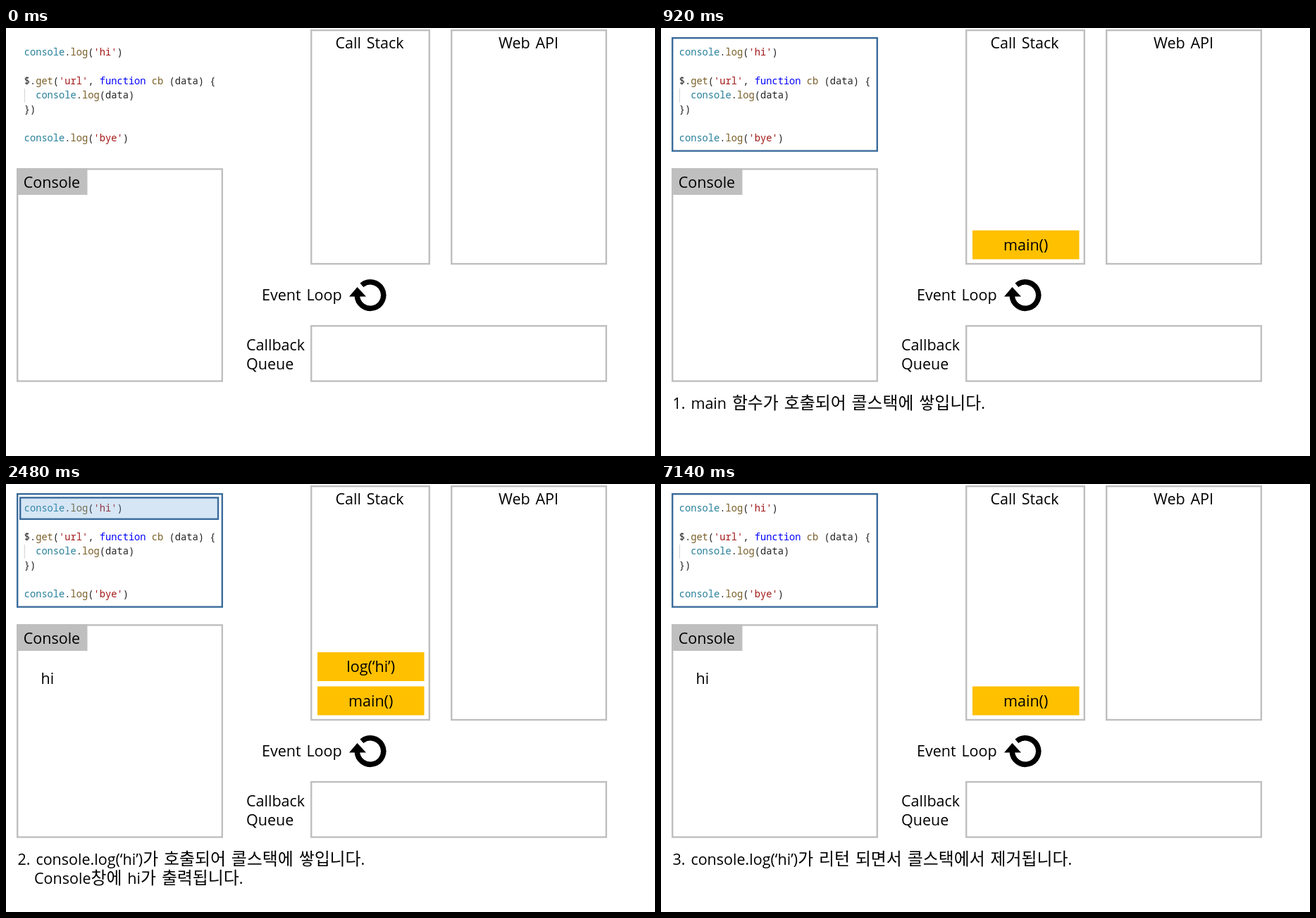
Write an HTML page that moves like this. It is 921 by 608 pixels and loops after 8 s.

```html
<!DOCTYPE html>
<html lang="ko">
<head>
<meta charset="utf-8">
<title>Event loop</title>
<style>
  html, body { margin: 0; width: 100%; height: 100%; overflow: hidden; background: #fff; }
  svg { display: block; width: 921px; height: 608px; }
  text { font: 21.5px 'Open Sans', 'Noto Sans CJK KR', sans-serif; word-spacing: 2.3px; white-space: pre; }
  .hangul { font: 23.9px 'Noto Sans CJK KR', 'Noto Sans CJK', sans-serif; }
  .mid { text-anchor: middle; }
  .code text { font: 13.72px 'Noto Sans Mono', monospace; word-spacing: 0; fill: #222; }
  .obj { fill: #267f99; }
  .fn { fill: #795e26; }
  .str { fill: #a31515; }
  .key { fill: #0000ff; }
  .panel { fill: none; stroke: #bfbfbf; stroke-width: 2.4; }
  .focus { fill: none; stroke: #3a6c9c; stroke-width: 2.4; }
  .call { fill: #ffc000; }
</style>
</head>
<body>
<svg viewBox="0 0 921 608">
  <rect class="panel" x="433.2" y="3.2" width="167.6" height="331.8"/>
  <rect class="panel" x="632.2" y="3.2" width="219.6" height="331.8"/>
  <rect class="panel" x="16.2" y="200.4" width="290.6" height="301.2"/>
  <rect class="panel" x="433.2" y="423.2" width="418.6" height="78.4"/>
  <rect x="15" y="199.2" width="100.5" height="37.8" fill="#bfbfbf"/>

  <text class="mid" x="516" y="28.5">Call Stack</text>
  <text class="mid" x="741.5" y="28.5">Web API</text>
  <text x="24.7" y="227">Console</text>
  <text x="363" y="387">Event Loop</text>
  <text x="341" y="458">Callback</text>
  <text x="341" y="485">Queue</text>

  <path d="M504.9 365.3A18.7 18.7 0 1 1 498.3 380" fill="none" stroke="#000" stroke-width="7.6"/>
  <path d="M487 381.5L498.5 368L511 381.5Z"/>

  <g class="code" id="code"></g>
  <path d="M26.5 86V106" stroke="#d3d3d3"/>

  <!-- data-steps lists the steps in which a part is visible -->
  <rect class="focus" data-steps="123" x="16.2" y="14.2" width="290.6" height="160.4"/>
  <rect class="focus" data-steps="2" x="20.2" y="19.4" width="280.8" height="30.4" style="fill:#5b9bd540"/>
  <g data-steps="123">
    <rect class="call" x="442" y="287.5" width="151.5" height="41"/>
    <text class="mid" x="517.7" y="316">main()</text>
  </g>
  <g data-steps="2">
    <rect class="call" x="442" y="239" width="151.5" height="41"/>
    <text class="mid" x="517.7" y="267">log(‘hi’)</text>
  </g>
  <text data-steps="23" x="49.5" y="284">hi</text>
  <text class="caption" data-steps="1" x="16.5" y="541">1. main 함수가 호출되어 콜스택에 쌓입니다.</text>
  <g data-steps="2">
    <text class="caption" x="16.5" y="541">2. console.log(‘hi’)가 호출되어 콜스택에 쌓입니다.</text>
    <text class="caption" x="40" y="568">Console창에 hi가 출력됩니다.</text>
  </g>
  <text class="caption" data-steps="3" x="16.5" y="541">3. console.log(‘hi’)가 리턴 되면서 콜스택에서 제거됩니다.</text>
</svg>
<script>
const LOOP = 8000;
const STEP_STARTS = [0, 920, 2480, 7140];

const codeLines = [
  "console.log('hi')",
  "",
  "$.get('url', function cb (data) {",
  "  console.log(data)",
  "})",
  "",
  "console.log('bye')",
];
const tokenClasses = [
  [/^console$/, "obj"],
  [/^(log|get|cb)$/, "fn"],
  [/^'/, "str"],
  [/^function$/, "key"],
];

function highlight(line) {
  return line.replace(/'\w+'|\w+/g, token => {
    const match = tokenClasses.find(([pattern]) => pattern.test(token));
    return match ? `<tspan class="${match[1]}">${token}</tspan>` : token;
  });
}

document.getElementById("code").innerHTML = codeLines
  .map((line, i) => `<text x="25.7" y="${39 + 20.35 * i}">${highlight(line)}</text>`)
  .join("");

for (const caption of document.querySelectorAll(".caption")) {
  caption.innerHTML = caption.textContent.replace(/[가-힣]+/g, '<tspan class="hangul">$&</tspan>');
}

const parts = document.querySelectorAll("[data-steps]");

function draw() {
  const time = performance.now() % LOOP;
  const step = STEP_STARTS.filter(start => start <= time).length - 1;
  for (const part of parts) {
    part.style.display = part.dataset.steps.includes(step) ? "" : "none";
  }
  requestAnimationFrame(draw);
}
draw();
</script>
</body>
</html>
```
